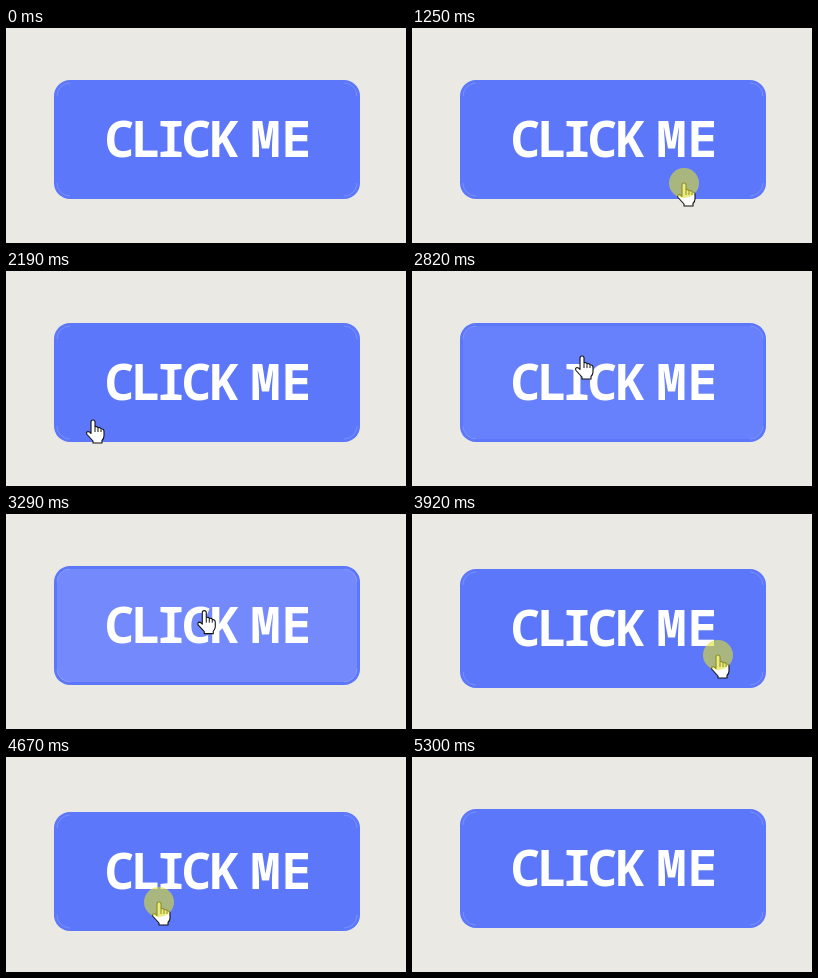
Recreate the animation shown at these times as an HTML page. Size 400 px wide and 215 px high, loop 5.72 s.

```html
<!DOCTYPE html>
<html lang="en">
<head>
<meta charset="utf-8">
<title>Click me</title>
<style>
  html, body { margin: 0; width: 100%; height: 100%; overflow: hidden; background: #eae9e4; }
  svg { display: block; width: 400px; height: 215px; }
  text { font: 700 50px "Noto Sans Mono", "DejaVu Sans Mono", monospace; fill: #fff; text-anchor: middle; }
  .face { fill: #5d77fb; }
  .rim { fill: none; stroke: #fff; stroke-opacity: .22; stroke-width: .8; }
  .hand { fill: #fff; stroke: #111; stroke-width: 1.1; stroke-linejoin: round; }
  .knuckles { fill: none; stroke: #111; }
  .halo { fill: #dde12e; fill-opacity: .6; }
</style>
</head>
<body>
<svg viewBox="0 0 400 215">
  <defs>
    <clipPath id="inner"><rect x="51" y="55" width="300" height="113" rx="13"/></clipPath>
  </defs>
  <g id="button">
    <rect class="face" x="48" y="52" width="306" height="119" rx="16"/>
    <path class="rim" d="M51 68a13 13 0 0 1 13-13M338 55a13 13 0 0 1 13 13M351 155a13 13 0 0 1-13 13M64 168a13 13 0 0 1-13-13"/>
    <g clip-path="url(#inner)"><circle id="ripple" fill="#fff"/></g>
    <text y="128.5" x="113.5 140 165 190.5 219 238 259.5 290.5">CLICK ME</text>
  </g>
  <g id="cursor">
    <path class="hand" d="M-2 13V2Q-2 0 0 0Q2 0 2 2V7Q4.5 6 5 8Q7.6 7 8 9Q11 8.6 11 11.5V16Q11 18.500 9 20.500V23H0V21L-6 14.500Q-7.200 12 -5 11.500Q-3.500 11.500 -2 13.500Z"/>
    <path class="knuckles" d="M2 7.500V12M5 8.500V12M8 9.500V12"/>
    <circle id="halo" class="halo" r="15"/>
  </g>
</svg>
<script>
  const LOOP = 5720, RIPPLE = 550, REACH = 612, PRESS_DEPTH = 3;
  const SHOW = 840, HIDE = 5290;

  // Cursor stops: arrival, departure, position
  const stops = [
    { arrive: 0, leave: 800, x: 275, y: 218 },
    { arrive: 1180, leave: 1600, x: 272, y: 155 },
    { arrive: 2190, leave: 2440, x: 87, y: 149 },
    { arrive: 2820, leave: 3080, x: 170, y: 85 },
    { arrive: 3780, leave: 4050, x: 306, y: 141 },
    { arrive: 4540, leave: LOOP, x: 153, y: 145 }
  ];

  // One click at each stop after the first
  const clicks = [
    { halo: 1242, down: 1335, up: 1385 },
    { halo: 2325, down: 2325, up: 2395 },
    { halo: 2945, down: 2945, up: 3015 },
    { halo: 3912, down: 3912, up: 3985 },
    { halo: 4600, down: 4600, up: 4738 }
  ].map((click, i) => ({ ...click, x: stops[i + 1].x, y: stops[i + 1].y }));

  const [button, ripple, cursor, halo] =
    ["button", "ripple", "cursor", "halo"].map(id => document.getElementById(id));
  const ease = p => (1 - Math.cos(Math.PI * p)) / 2;
  const visible = (el, on) => el.setAttribute("visibility", on ? "inherit" : "hidden");
  const moveTo = (el, x, y) => el.setAttribute("transform", `translate(${x} ${y})`);

  function cursorAt(t) {
    const i = stops.findLastIndex(s => t >= s.arrive);
    const from = stops[i], to = stops[i + 1];
    if (!to || t <= from.leave) return from;
    const p = ease((t - from.leave) / (to.arrive - from.leave));
    return { x: from.x + (to.x - from.x) * p, y: from.y + (to.y - from.y) * p };
  }

  function draw(t) {
    const pos = cursorAt(t);
    moveTo(cursor, pos.x, pos.y);
    visible(cursor, t >= SHOW && t < HIDE);
    visible(halo, clicks.some(c => t >= c.halo && t < c.up));
    moveTo(button, 0, clicks.some(c => t >= c.down && t < c.up) ? PRESS_DEPTH : 0);

    const click = clicks.find(c => t >= c.up && t < c.up + RIPPLE);
    visible(ripple, click);
    if (click) {
      const p = (t - click.up) / RIPPLE;
      moveTo(ripple, click.x, click.y);
      ripple.setAttribute("r", REACH * p);
      ripple.setAttribute("fill-opacity", 0.28 * (1 - p));
    }
  }

  const start = performance.now();
  function tick() {
    draw((performance.now() - start) % LOOP);
    requestAnimationFrame(tick);
  }
  tick();
</script>
</body>
</html>
```
